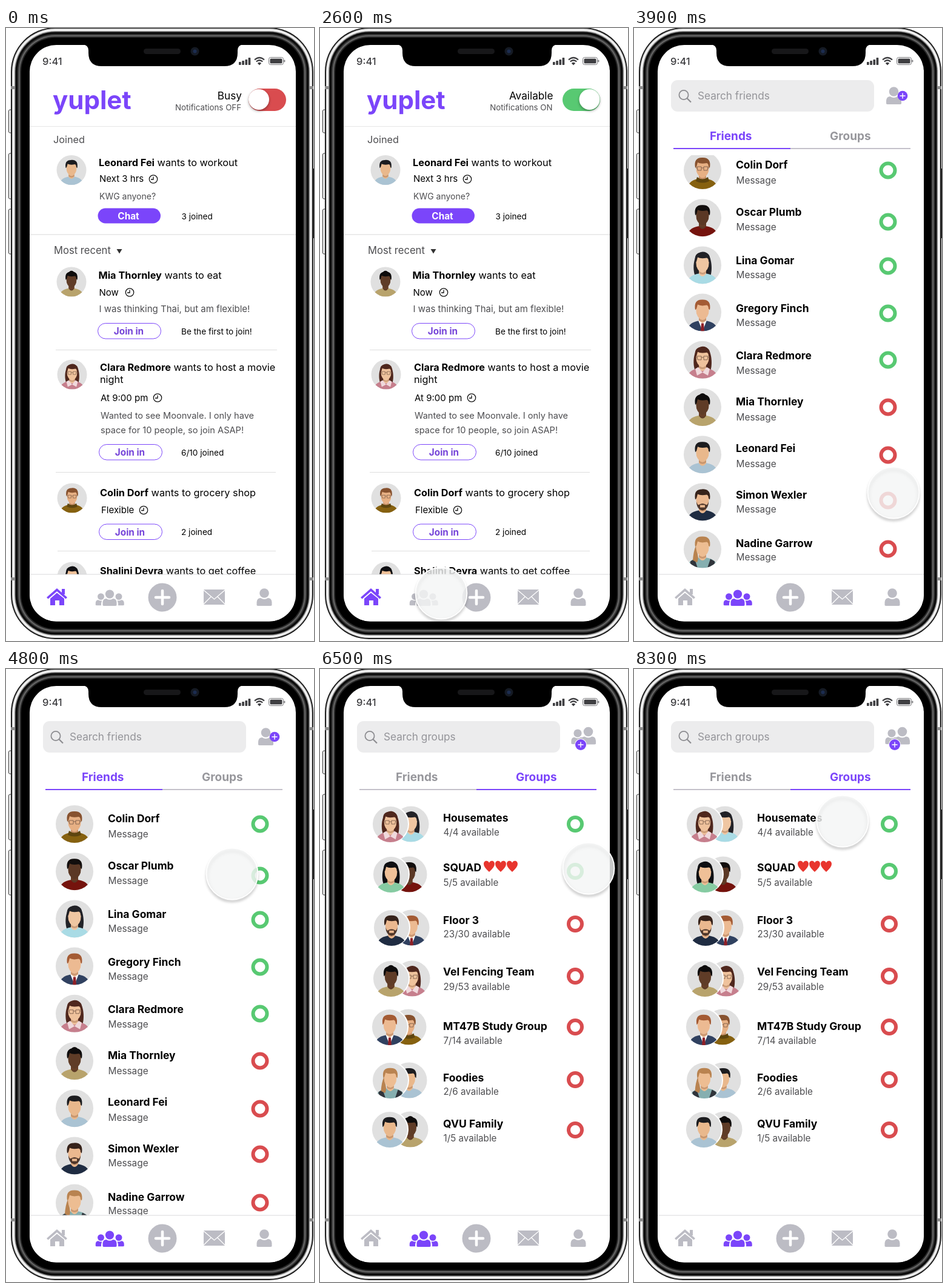
Write an HTML page that moves like this. It is 508 by 1012 pixels and loops after 8400 ms.

```html
<!DOCTYPE html>
<html lang="en">
<head>
<meta charset="utf-8">
<style>
  html, body { margin: 0; width: 100%; height: 100%; overflow: hidden; background: #fff; }
  svg { display: block; width: 100vw; height: 100vh; font-family: Inter, "Open Sans", sans-serif; }
  .knob { filter: drop-shadow(0 2px 2px rgba(0, 0, 0, .35)); }
  .shade { filter: blur(2px); }
</style>
</head>
<body>
<svg id="stage" viewBox="0 0 508 1012"></svg>
<script>
const PURPLE = '#7b45fa', GREY = '#bcbcc4', GREEN = '#58c972', RED = '#d94c4f', DIM = '#4d4d50';

// Shape helpers
const box = (x, y, w, h, fill, rx = 0, more = '') =>
  `<rect x="${x}" y="${y}" width="${w}" height="${h}" rx="${rx}" fill="${fill}" ${more}/>`;
const dot = (x, y, r, fill, more = '') => `<circle cx="${x}" cy="${y}" r="${r}" fill="${fill}" ${more}/>`;
const path = (d, fill, more = '') => `<path d="${d}" fill="${fill}" ${more}/>`;
const line = (d, stroke, width = 1, more = '') =>
  path(d, 'none', `stroke="${stroke}" stroke-width="${width}" ${more}`);
const text = (x, mid, s, size, fill = '#000', more = '') =>
  `<text x="${x}" y="${mid + size * .36}" font-size="${size}" fill="${fill}" ${more}>${s}</text>`;
const bold = (x, mid, s, size, fill, more = '') => text(x, mid, s, size, fill, `font-weight="650" ${more}`);
const group = (id, body) => `<g id="${id}">${body}</g>`;
const clip = (id, body) => `<g clip-path="url(#${id})">${body}</g>`;

// Portraits: skin, hair, shirt, features
const people = {
  leonard: ['#e9b88c', '#1c1c1f', '#aac3d3', ''],
  mia:     ['#5f3c27', '#0e0c0c', '#b8a36c', 'bun'],
  clara:   ['#efc29c', '#4f271d', '#c67f8d', 'long glasses collar'],
  colin:   ['#e7b084', '#87522f', '#866110', 'glasses scarf'],
  shalini: ['#efc097', '#0f0f12', '#86cba2', 'long'],
  oscar:   ['#5b3825', '#120e0d', '#75130d', ''],
  lina:    ['#efc6a2', '#222227', '#a9dbe5', 'long'],
  gregory: ['#ecba92', '#a45b34', '#304160', 'tie'],
  simon:   ['#ebb88f', '#36221a', '#1f2c42', 'beard'],
  nadine:  ['#edbd92', '#b98350', '#86afb0', 'braid']
};

function avatar(name, x, y, r, more = '') {
  const [skin, hair, shirt, features] = people[name];
  const when = (feature, shapes) => features.includes(feature) ? shapes : '';
  return `<g transform="translate(${x} ${y}) scale(${r / 31})">` + dot(0, 0, 31, '#e0e0e0', more) + clip('disc',
    when('long', path('M-12 18C-17 8-16-21 0-22S17 8 13 18Z', hair)) +
    when('bun', dot(0, -17, 6, hair)) +
    path('M-25 31Q-24 17-7 14H7Q24 17 25 31Z', shirt) +
    path('M-6 4H6V14Q0 23-6 14Z', skin) + path('M-6 9Q0 16 6 9V13Q0 18-6 13Z', '#7a4528', 'fill-opacity=".3"') +
    when('scarf', path('M-9 11Q0 18 9 11L11 18Q0 23-11 18Z', '#5e450f')) +
    when('collar', path('M-7 12L0 21-9 26-12 15ZM7 12L0 21 9 26 12 15Z', '#f0d9dc')) +
    when('tie', path('M-7 13L0 31 7 13 0 18Z', '#fff') + path('M-2 18H2L3 31H-3Z', '#8e1f26')) +
    when('braid', path('M-20 31V20L-13 16-8 31ZM20 31V20L13 16 8 31Z', '#30343b')) +
    path('M-11-8Q-11-19 0-19T11-8L10 2Q7 11 0 12-7 11-10 2Z', skin) +
    path('M-12-4Q-15-21-1-21 15-22 12-4L10-6Q10-11 7-12-3-10-8-13L-10-6Z', hair) +
    when('braid', path('M-11-6Q-15 4-16 18L-9 22Q-5 14-10 2Z', hair)) +
    when('beard', path('M-10-1Q-8 7-5 4 0 1 5 4 8 7 10-1 10 12 0 14-10 12-10-1ZM-4 5V9H4V5Z', hair,
      'fill-opacity=".85" fill-rule="evenodd"')) +
    when('glasses', line('M-11-4H-9M9-4H11M-2-4H2M-9-6H-2V0H-8ZM9-6H2V0H8Z', '#7b5d4a', .9))) + '</g>';
}

// Interface parts
const clock = (x, y) => dot(x, y, 6.7, 'none', 'stroke="#111" stroke-width="1.3"') +
  line(`M${x} ${y - 4}V${y + .5}H${x - 4}`, '#111', 1.3);
const ring = (x, y, color, r = 11.5) => dot(x, y, r, '#fff', `stroke="${color}" stroke-width="6"`);
const rule = (x1, x2, y, color = '#dedede') => line(`M${x1} ${y}H${x2}`, color, 1.2);
const person = (x, y, k, fill) => `<g transform="translate(${x} ${y}) scale(${k})">` +
  dot(0, -7, 7.8, fill) + path('M-12.5 13V8Q-12 1-6 1 0 5 6 1 12 1 12.5 8V13Q12 14 10 14H-10Q-12 14-12.5 13Z', fill) + '</g>';
const plusBadge = (x, y, r) => dot(x, y, r, PURPLE) +
  line(`M${x - 4.5} ${y}h9M${x} ${y - 4.5}v9`, '#fff', 1.4);
const joinButton = (x, y) => box(x, y, 104, 25.5, '#fff', 12.7, `stroke="${PURPLE}"`) +
  bold(x + 51, y + 13, 'Join in', 15.3, '#7544d8', 'text-anchor="middle"');
const post = (x, y, name, action) =>
  text(x, y, `<tspan font-weight="650">${name}</tspan> ${action}`, 16.3);

const toggle = on => {
  const end = 'text-anchor="end"', right = on ? 384.5 : 389;
  return text(right, 111.5, on ? 'Available' : 'Busy', 17.2, '#000', end) +
    text(right - 1, 131, `Notifications ${on ? 'ON' : 'OFF'}`, 13.3, DIM, end) +
    box(400, 100, 62, 37, on ? GREEN : RED, 18.5) + dot(on ? 444.5 : 417, 118, 17, '#fff', 'class="knob"');
};

const home = () => bold(77, 119, 'yuplet', 42, PURPLE) +
  group('busy', toggle(false)) + group('available', toggle(true)) +
  rule(39, 478, 162.5, '#e6e6e6') + text(78, 184, 'Joined', 16.3, DIM) +
  avatar('leonard', 108, 234.5, 24.5) + post(153, 222, 'Leonard Fei', 'wants to workout') +
  text(154, 249, 'Next 3 hrs', 15) + clock(243, 249.5) + text(154, 278, 'KWG anyone?', 14, DIM) +
  box(151.5, 297.5, 103.5, 25, PURPLE, 12.5) + bold(202, 310, 'Chat', 15.3, '#fff', 'text-anchor="middle"') +
  text(289.5, 311, '3 joined', 13.6) + rule(39, 478, 341, '#d8d8d8') +
  text(79, 367, 'Most recent', 16.6, DIM) + path('M182.5 365H191.5L187 372.5Z', '#333') +

  avatar('mia', 108, 419, 24.5) + post(152.5, 408, 'Mia Thornley', 'wants to eat') +
  text(153.5, 436.5, 'Now', 15) + clock(204, 436.5) +
  text(153.5, 464, 'I was thinking Thai, but am flexible!', 15, DIM) +
  joinButton(151.5, 487.5) + text(289, 501, 'Be the first to join!', 13.6) + rule(82, 447, 531.5) +

  avatar('clara', 109, 572, 24.5) + post(155, 560, 'Clara Redmore', 'wants to host a movie') +
  text(155, 580.5, 'night', 16.3) + text(156, 610.5, 'At 9:00 pm', 15) + clock(250, 610.5) +
  text(156, 640, 'Wanted to see Moonvale. I only have', 14.6, DIM) +
  text(156, 664, 'space for 10 people, so join ASAP!', 14.6, DIM) +
  joinButton(153.5, 687.5) + text(289, 701.5, '6/10 joined', 13.6) + rule(82, 445, 733.5) +

  avatar('colin', 109, 776, 24.5) + post(155, 767.5, 'Colin Dorf', 'wants to grocery shop') +
  text(157, 796, 'Flexible', 15) + clock(227, 796) +
  joinButton(153.5, 819) + text(289, 832.5, '2 joined', 13.6) + rule(85, 445, 863.5) +
  avatar('shalini', 109, 906, 24.5) + post(155, 896, 'Shalini Devra', 'wants to get coffee');

const searchHeader = (kind, second) => box(61, 86, 335, 52, '#ececed', 11) +
  dot(82, 110.5, 7.6, 'none', 'stroke="#8d8d91" stroke-width="1.8"') + line('M87.5 116L94 122.5', '#8d8d91', 2.2) +
  text(105, 112, `Search ${kind}`, 17.2, '#949499') +
  bold(125, 178, 'Friends', 19, second ? '#97979c' : PURPLE) +
  bold(323, 178, 'Groups', 19, second ? PURPLE : '#97979c') +
  line('M65 199H456', '#b0acb8', 1.5) + line(second ? 'M258 199H456' : 'M65 199H258', PURPLE, 2.2);

// Key, name, then the heights of name, message and ring
const friendRows = [
  ['colin', 'Colin Dorf', 247, 272, 256], ['oscar', 'Oscar Plumb', 325, 349, 341],
  ['lina', 'Lina Gomar', 405, 428, 414], ['gregory', 'Gregory Finch', 484, 507, 492],
  ['clara', 'Clara Redmore', 562, 586, 569], ['mia', 'Mia Thornley', 638, 663, 647],
  ['leonard', 'Leonard Fei', 715, 740, 726], ['simon', 'Simon Wexler', 792, 815, 801],
  ['nadine', 'Nadine Garrow', 872, 894, 881]
];
const friendRow = ([key, name, top, sub, mark], i) =>
  avatar(key, 113, 256 + 78.2 * i, 31) + bold(168, top, name, 17.4) +
  text(168.5, sub, 'Message', 15.4, DIM) + ring(419, mark, i < 5 ? GREEN : RED);
const friends = () => searchHeader('friends', false) + person(428.5, 112, 1, GREY) + plusBadge(443, 112, 8.3) +
  clip('listArea', group('list', friendRows.map(friendRow).join('')));

// Front and back portraits with their x, portrait height, title, count, heights of title, count and ring
const groupRows = [
  ['clara', 'lina', 116, 150, 256, 'Housemates', '4/4', 246, 270, 256],
  ['shalini', 'oscar', 117, 147, 339, 'SQUAD', '5/5', 328, 353, 334],
  ['simon', 'gregory', 118, 151, 427, 'Floor 3', '23/30', 415, 438, 421],
  ['mia', 'clara', 117, 152, 511, 'Vel Fencing Team', '29/53', 500, 525, 507],
  ['gregory', 'colin', 115, 146, 591, 'MT47B Study Group', '7/14', 590, 614, 591],
  ['nadine', 'leonard', 116, 147, 679, 'Foodies', '2/6', 675, 698, 678],
  ['leonard', 'mia', 115, 149, 760, 'QVU Family', '1/5', 751, 775, 761]
];
const groupRow = ([front, back, x, x2, y, title, count, top, sub, mark], i) =>
  avatar(back, x2, y, 29.5) + avatar(front, x, y, 30, 'stroke="#fff" stroke-width="2"') +
  bold(203, top, title, 17.5) + text(203.5, sub, `${count} available`, 15.2, DIM) +
  ring(421, mark, i < 2 ? GREEN : RED, 11);
const heart = x => path(`M${x} 335q-9-8-9-13c0-6 7-7 9-2c2-5 9-4 9 2q0 5-9 13Z`, '#e8352e');
const groups = () => searchHeader('groups', true) +
  person(425, 112, .85, GREY) + person(442.5, 110.5, 1, GREY) +
  dot(430, 125, 10, '#fff') + plusBadge(430, 125, 9) +
  groupRows.map(groupRow).join('') + [279, 298, 317].map(heart).join('');

const houseIcon = fill => path('M84 925L101 940 98.5 942.5 84 930 69.5 942.5 67 940Z', fill) +
  box(92, 926, 5, 9, fill) + path('M73 942L84 932.5 96 942V953H88V945H81V953H73Z', fill);
const peopleIcon = fill => person(156.5, 943.5, .7, fill) + person(186, 943.5, .7, fill) +
  person(171, 941, 1.12, '#fff') + person(171, 941, .92, fill);
const nav = () => box(39, 902, 439, 80, '#fff') + rule(39, 478, 902, '#d9d9dc') +
  group('homeOn', houseIcon(PURPLE) + peopleIcon(GREY)) +
  group('peopleOn', houseIcon(GREY) + peopleIcon(PURPLE)) +
  dot(258, 940, 23.5, GREY) + line('M247 940H269M258 929V951', '#fff', 4.5, 'stroke-linecap="round"') +
  box(326, 927, 35, 25, GREY, 1) + line('M326 928L343.5 943 361 928M326 951L338 939M361 951L349 939', '#fff', 1.3) +
  person(426, 940, 1, GREY);

const statusBar = () => text(60, 55, '9:41', 16.5, '#3c3c3f', 'font-weight="500"') +
  [5, 7, 9, 12].map((h, i) => box(384 + 5.2 * i, 61 - h, 3.7, h, '#3f3f42', .8)).join('') +
  line('M410 52.5Q418 45.5 426 52.5M412.7 55.5Q418 51 423.3 55.5', '#3f3f42', 2.2) +
  path('M414.8 58Q418 55.5 421.2 58L418 61.5Z', '#3f3f42') +
  box(433.5, 48.5, 24, 12, 'none', 3, 'stroke="#77777a"') + box(435.5, 50.5, 20, 8, '#3f3f42', 1.5) +
  box(458.5, 52.5, 1.8, 4, '#77777a', 1);

// Phone body as nested layers: inset and colour
const shell = [[0, '#1d1d1d'], [2, '#dcdcdc'], [3.5, '#f4f4f4'], [6, '#8c8c8c'], [7.5, '#0c0c0c'],
  [11, '#3a3a3a'], [13, '#666'], [15, '#2a2a2a'], [17, '#000']];
const phone = () => [[135, 38], [207, 75], [299, 74]].map(([y, h]) =>
    box(4.5, y, 6, h, '#f4f4f4', 2, 'stroke="#333"')).join('') + box(504, 232, 5, 115, '#222', 1) +
  shell.map(([d, fill]) => box(8 + d, d - 1, 499 - 2 * d, 1010 - 2 * d, fill, 73 - d)).join('') +
  [96, 907].map(y => box(8, y, 7, 5, '#8d8d8d') + box(500, y, 7, 5, '#8d8d8d')).join('');
const notch = () => path('M126 27Q136 28 136 37V41Q136 63 158 63H360Q382 63 382 41V37Q382 28 392 27Z', '#000') +
  box(227, 34, 61, 9, '#171719', 4.5) + dot(311.5, 38.5, 7, '#151a24') + dot(311.5, 38.5, 3, '#1c2c50');

const stage = document.getElementById('stage');
stage.innerHTML = `<defs>
  <clipPath id="disc"><circle r="31"/></clipPath>
  <clipPath id="listArea">${box(39, 210, 439, 692, '#fff')}</clipPath>
  <clipPath id="screen">${box(39, 28, 439, 951.5, '#fff', 44)}</clipPath></defs>` + phone() +
  clip('screen', box(39, 28, 439, 952, '#fff') +
    group('home', home()) + group('friends', friends()) + group('groups', groups()) +
    nav() + statusBar()) + notch() +
  group('touch', dot(0, 4, 41, 'none', 'class="shade" stroke="#000" stroke-opacity=".24" stroke-width="4"') +
    dot(0, 0, 42.5, '#f4f6f6', 'fill-opacity=".82" stroke="#fff" stroke-width="1.8"'));

// Motion: time, then position of the touch or offset of the list
const touchKeys = [[0, 600, 520], [300, 560, 430], [1150, 425, 125], [1350, 425, 122], [1700, 470, 115],
  [1850, 470, 115], [2600, 200, 933], [2800, 171, 940], [3000, 171, 940], [3450, 428, 800], [3800, 428, 767],
  [4050, 428, 767], [4300, 430, 790], [4800, 373, 338], [5200, 357, 180], [5500, 357, 180], [6150, 443, 250],
  [6500, 443, 329], [7100, 446, 740], [7400, 446, 740], [8300, 344, 251], [8400, 344, 251]];
const listKeys = [[0, 0], [3450, 0], [3800, -21], [4050, -21], [4300, 0], [8400, 0]];

// Smooth curve through the keys that comes to rest at turning points
function sample(keys, t, axis) {
  const i = Math.max(0, keys.findIndex(k => k[0] > t) - 1);
  const slope = n => {
    const a = keys[n - 1], b = keys[n], c = keys[n + 1];
    return !a || !c || (b[axis] - a[axis]) * (c[axis] - b[axis]) <= 0 ? 0 : (c[axis] - a[axis]) / (c[0] - a[0]);
  };
  const [p, q] = [keys[i], keys[i + 1]], d = q[0] - p[0], u = (t - p[0]) / d, s = u * u * (3 - 2 * u);
  return p[axis] + (q[axis] - p[axis]) * s + d * u * (1 - u) * (slope(i) * (1 - u) - slope(i + 1) * u);
}

const el = id => document.getElementById(id);
const show = (id, on) => el(id).setAttribute('display', on ? 'inline' : 'none');
const place = (id, x, y) => el(id).setAttribute('transform', `translate(${x} ${y})`);

function draw(now) {
  const t = Math.floor(now % 8400 / 100) * 100;
  const screen = t < 2900 ? 'home' : t < 5500 ? 'friends' : 'groups';
  for (const id of ['home', 'friends', 'groups']) show(id, id === screen);
  show('homeOn', screen === 'home');
  show('peopleOn', screen !== 'home');
  show('busy', t < 1400);
  show('available', t >= 1400);
  place('list', 0, sample(listKeys, t, 1));
  place('touch', sample(touchKeys, t, 1), sample(touchKeys, t, 2));
  requestAnimationFrame(draw);
}
draw(performance.now());
</script>
</body>
</html>
```
